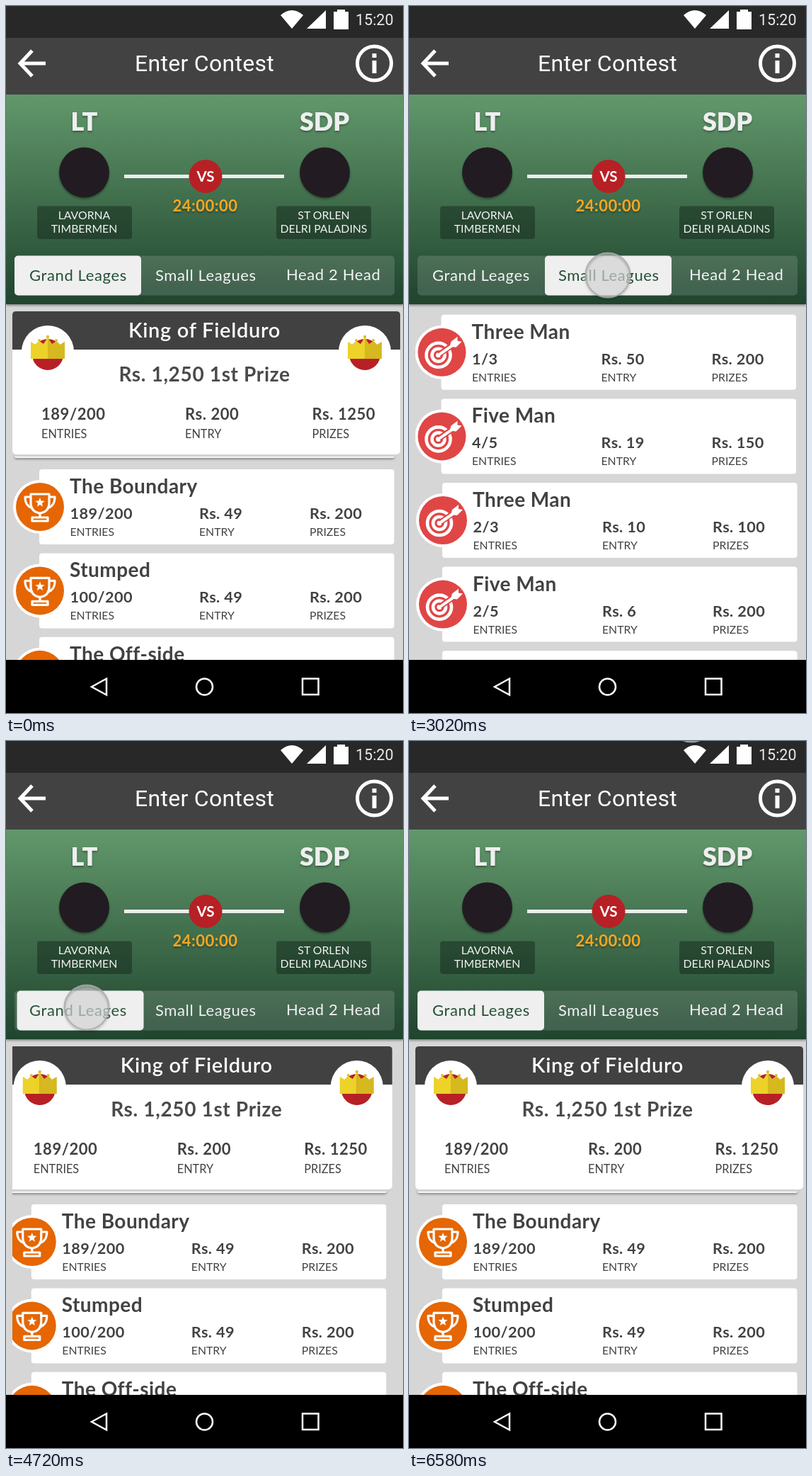
Recreate the animation shown at these times as an HTML page. Size 561 by 998 pixels, loop 6.6 s.

```html
<!DOCTYPE html>
<html lang="en">
<head>
<meta charset="utf-8">
<title>Enter Contest</title>
<style>
  html, body { margin: 0; width: 100%; height: 100%; overflow: hidden; background: #000; }
  svg { display: block; width: 100%; height: 100%; }
  text { font-family: Lato, "Open Sans", sans-serif; }
  .sys { font-family: Roboto, sans-serif; fill: #fff; }
  .mid { text-anchor: middle; }
  .team { font-size: 36px; font-weight: 900; fill: #efefef; }
  .club { font-size: 15.8px; fill: #f2f2f2; }
  .tab { font-size: 22px; letter-spacing: .62px; }
  .title { font-size: 28px; font-weight: 700; letter-spacing: .45px; fill: #424242; }
  .value { font-size: 21.7px; font-weight: 700; letter-spacing: .4px; fill: #424242; }
  .label { font-size: 15.8px; fill: #424242; }
  .top .value { font-size: 22px; letter-spacing: .55px; }
  .top .label { font-size: 16.3px; }
</style>
</head>
<body>
<svg viewBox="0 0 561 998" xmlns="http://www.w3.org/2000/svg">
  <defs>
    <linearGradient id="field" x2="0" y2="1">
      <stop offset="0" stop-color="#62986c"/>
      <stop offset="1" stop-color="#1f442d"/>
    </linearGradient>
    <filter id="soft" x="-20%" y="-20%" width="140%" height="150%">
      <feDropShadow dx="0" dy="2" stdDeviation="1.5" flood-opacity=".35"/>
    </filter>
    <clipPath id="view"><rect x="9" y="421" width="552" height="502"/></clipPath>

    <g id="crown">
      <circle r="37" fill="#fff"/>
      <circle cy="4" r="22" fill="#b72025"/>
      <path d="M-24-14L-17-10-12-15-6-11 0-20V10H-24Z" fill="#ecd229"/>
      <path d="M24-14L17-10 12-15 6-11 0-20V10H24Z" fill="#d6b81f"/>
      <g fill="#dfc024"><circle cx="-12" cy="-16" r="2"/><circle cy="-21" r="2.2"/><circle cx="12" cy="-16" r="2"/></g>
    </g>

    <g id="trophy">
      <circle r="38" fill="#fff"/>
      <circle r="34" fill="#e56603"/>
      <g fill="none" stroke="#fff" stroke-width="3.2" stroke-linejoin="round">
        <path d="M-13-18H13V-6C13 4 7 8 0 9C-7 8-13 4-13-6Z"/>
        <path d="M-13-14H-21C-21-4-17 0-10 2M13-14H21C21-4 17 0 10 2M0 9V15"/>
        <rect x="-11" y="15" width="22" height="5"/>
      </g>
      <path id="star" fill="#fff"/>
    </g>

    <g id="target">
      <circle r="38" fill="#fff"/>
      <circle r="34" fill="#e04646"/>
      <g fill="none" stroke="#fff" stroke-width="4.6">
        <circle cx="-5" cy="4" r="17"/>
        <circle cx="-5" cy="4" r="9"/>
      </g>
      <circle cx="-5" cy="4" r="3.5" fill="#fff"/>
      <path d="M-4 3L22-15" stroke="#e04646" stroke-width="8"/>
      <path d="M-5 4L18-12" stroke="#fff" stroke-width="4"/>
      <path d="M11-8L13-15 22-22 22-16 28-15 20-7Z" fill="#fff"/>
    </g>
  </defs>

  <rect width="561" height="998" fill="#d6d6d6"/>

  <g clip-path="url(#view)">
    <g id="grand">
      <rect x="12" y="620" width="537" height="18" rx="3" fill="#f6f6f6" filter="url(#soft)"/>
      <rect x="9" y="600" width="548" height="36" rx="5" fill="#d2d2d2"/>
      <rect x="9" y="431" width="548" height="202" rx="5" fill="#fff"/>
      <path d="M9 485V436Q9 431 14 431H552Q557 431 557 436V485Z" fill="#424142"/>
      <use href="#crown" x="59" y="488"/>
      <use href="#crown" x="507" y="488"/>
      <text class="mid" x="280.5" y="468" font-size="29" font-weight="600" letter-spacing=".7" fill="#fff">King of Fielduro</text>
      <text class="mid" x="280.5" y="530" font-size="28" font-weight="700" letter-spacing=".65" fill="#4a4a4a">Rs. 1,250 1st Prize</text>
      <g class="top" id="best"></g>
    </g>
    <g id="small"></g>
  </g>

  <rect y="125" width="561" height="296" fill="url(#field)" filter="url(#soft)"/>
  <rect width="561" height="46" fill="#282828"/>
  <rect y="45" width="561" height="80" fill="#424242"/>

  <g fill="#fff">
    <path d="M404 32L388 13Q404-1 420 13Z"/>
    <path d="M452 6V32H425Z"/>
    <path d="M463 8H468V5H479V8H484V33H463Z"/>
    <path d="M517.5 77H523.5V95H517.5ZM517.5 67H523.5V73H517.5Z"/>
  </g>
  <text class="sys" x="494" y="27" font-size="21.5" fill-opacity=".9">15:20</text>
  <text class="sys mid" x="280.5" y="92" font-size="32" letter-spacing=".3">Enter Contest</text>
  <g fill="none" stroke="#fff" stroke-width="5">
    <path d="M56 81H21M37 63L20 81 37 99"/>
    <circle cx="520.5" cy="81" r="24"/>
  </g>

  <g class="mid" filter="url(#soft)">
    <text class="team" x="110.5" y="176">LT</text>
    <text class="team" x="450" y="176">SDP</text>
    <text x="281.5" y="290" font-size="22" font-weight="700" letter-spacing=".5" fill="#f5a623">24:00:00</text>
  </g>
  <g fill="#231f20" filter="url(#soft)">
    <circle cx="110.5" cy="235" r="35.5"/>
    <circle cx="450.5" cy="235" r="35.5"/>
  </g>
  <path d="M167 240.5H393" stroke="#eee" stroke-width="5"/>
  <circle cx="282" cy="240.5" r="23.5" fill="#b72025"/>
  <text class="mid" x="282" y="248" font-size="20.5" font-weight="700" fill="#fff">VS</text>
  <g fill="#14281c" fill-opacity=".5">
    <rect x="44" y="282.5" width="134" height="46.5" rx="4"/>
    <rect x="382" y="282.5" width="134" height="46.5" rx="4"/>
  </g>
  <g class="mid">
    <text class="club" x="110.5" y="301">LAVORNA</text>
    <text class="club" x="110.5" y="319.5">TIMBERMEN</text>
    <text class="club" x="449" y="301">ST ORLEN</text>
    <text class="club" x="449" y="319.5">DELRI PALADINS</text>
  </g>

  <rect x="12" y="352.5" width="537" height="56" rx="5" fill="#fff" fill-opacity=".14"/>
  <rect id="pill" x="12" y="352.5" width="179" height="56" rx="5" fill="#efefef"/>
  <text class="tab" id="tab0" x="33" y="388">Grand Leages</text>
  <text class="tab" id="tab1" x="211" y="388">Small Leagues</text>
  <text class="tab" x="396" y="387" fill="#f4f4f4">Head 2 Head</text>

  <g id="touch">
    <circle r="32" fill="#d2d2d2" fill-opacity=".68"/>
    <circle r="31.5" fill="none" stroke="#a4a4a4" stroke-opacity=".75" stroke-width="2" filter="url(#soft)"/>
  </g>

  <rect y="923" width="561" height="75"/>
  <g fill="none" stroke="#fff" stroke-width="2.5">
    <path d="M121 961L142 949.5V972.5Z"/>
    <circle cx="280.5" cy="961" r="11.5"/>
    <rect x="419" y="949.5" width="22.5" height="22.5"/>
  </g>
</svg>
<script>
const LOOP = 6600, PAGE = 576;
const $ = id => document.getElementById(id);
const text = (cls, x, y, s) => `<text class="${cls}" x="${x}" y="${y}">${s}</text>`;

const stats = (xs, y, values, gap) => ["ENTRIES", "ENTRY", "PRIZES"].map((name, i) =>
  text("value", xs[i], y, values[i]) + text("label", xs[i], y + gap, name)).join("");

function card(icon, x, y, title, ...values) {
  return `<g transform="translate(${x} ${y})">
    <rect x="47" width="501.5" height="106" rx="4" fill="#fff"/>
    <use href="#${icon}" x="48" y="53"/>
    ${text("title", 90, 34, title)}${stats([90.5, 273, 429], 70, values, 24)}</g>`;
}

$("best").innerHTML = stats([50, 253, 432.5], 584, ["189/200", "Rs. 200", "Rs. 1250"], 26);

$("grand").insertAdjacentHTML("beforeend", [
  ["The Boundary", "189/200", "Rs. 49", "Rs. 200"],
  ["Stumped", "100/200", "Rs. 49", "Rs. 200"],
  ["The Off-side", "100/200", "Rs. 49", "Rs. 200"]
].map((row, i) => card("trophy", 0, 654 + 118.4 * i, ...row)).join(""));

$("small").innerHTML = [
  ["Three Man", "1/3", "Rs. 50", "Rs. 200"],
  ["Five Man", "4/5", "Rs. 19", "Rs. 150"],
  ["Three Man", "2/3", "Rs. 10", "Rs. 100"],
  ["Five Man", "2/5", "Rs. 6", "Rs. 200"],
  ["Three Man", "1/3", "Rs. 5", "Rs. 100"]
].map((row, i) => card("target", i < 2 ? -1.5 : 0, 435.8 + 118.6 * i, ...row)).join("");

$("star").setAttribute("d", "M" + Array.from({ length: 10 }, (_, i) => {
  const r = i % 2 ? 3 : 7, a = i * Math.PI / 5;
  return `${(r * Math.sin(a)).toFixed(2)} ${(-6 - r * Math.cos(a)).toFixed(2)}`;
}).join("L") + "Z");

// Touch path: start, end, then Bezier points; the last point is held.
const moves = [
  [0, 0, [399, -45]],
  [60, 720, [399, -36], [450, 90], [375, 330], [277, 350]],
  [720, 1050, [277, 350], [265, 357], [259, 368]],
  [1050, 1360, [259, 368], [266, 375]],
  [1660, 1660, [260, 374]],
  [2600, 2760, [260, 374], [288, 387]],
  [3020, 3400, [281, 380], [200, 370], [109, 372]],
  [3400, 3660, [109, 372], [120, 375]],
  [4360, 4360, [114, 376]],
  [5140, 5680, [114, 376], [175, 460], [450, 220], [399, -45]],
  [6040, 6040, [399, -31.5]],
  [6060, 6060, [399, -45]],
  [6580, 6580, [399, -30]]
];

const mix = (a, b, u) => a + (b - a) * u;
const smooth = u => u * u * (3 - 2 * u);

function bezier(points, u) {
  while (points.length > 1)
    points = points.slice(1).map((p, i) => [mix(points[i][0], p[0], u), mix(points[i][1], p[1], u)]);
  return points[0];
}

function touchAt(t) {
  const [start, end, ...points] = moves.findLast(m => m[0] <= t);
  const u = end > start ? Math.min(1, (t - start) / (end - start)) : 1;
  return bezier(points, smooth(u));
}

// Part of a page change still to go: a jump, then exponential settling.
const rest = dt => dt > 320 ? 0 : .353 * Math.exp(-dt / 48.7);

function pageAt(t) {
  if (t < 1840) return 0;
  return t < 4580 ? 1 - rest(t - 1840) : rest(t - 4580);
}

const tabColor = on => `rgb(${mix(244, 36, on)} ${mix(244, 80, on)} ${mix(244, 54, on)})`;
const place = (id, x, y = 0) => $(id).setAttribute("transform", `translate(${x} ${y})`);

function draw(t) {
  const p = pageAt(t);
  place("grand", -PAGE * p);
  place("small", PAGE * (1 - p));
  $("pill").setAttribute("x", 12 + 180 * p);
  $("tab0").setAttribute("fill", tabColor(1 - p));
  $("tab1").setAttribute("fill", tabColor(p));
  place("touch", ...touchAt(t));
}

const began = performance.now();
function tick() {
  draw((performance.now() - began) % LOOP);
  requestAnimationFrame(tick);
}
tick();
</script>
</body>
</html>
```
